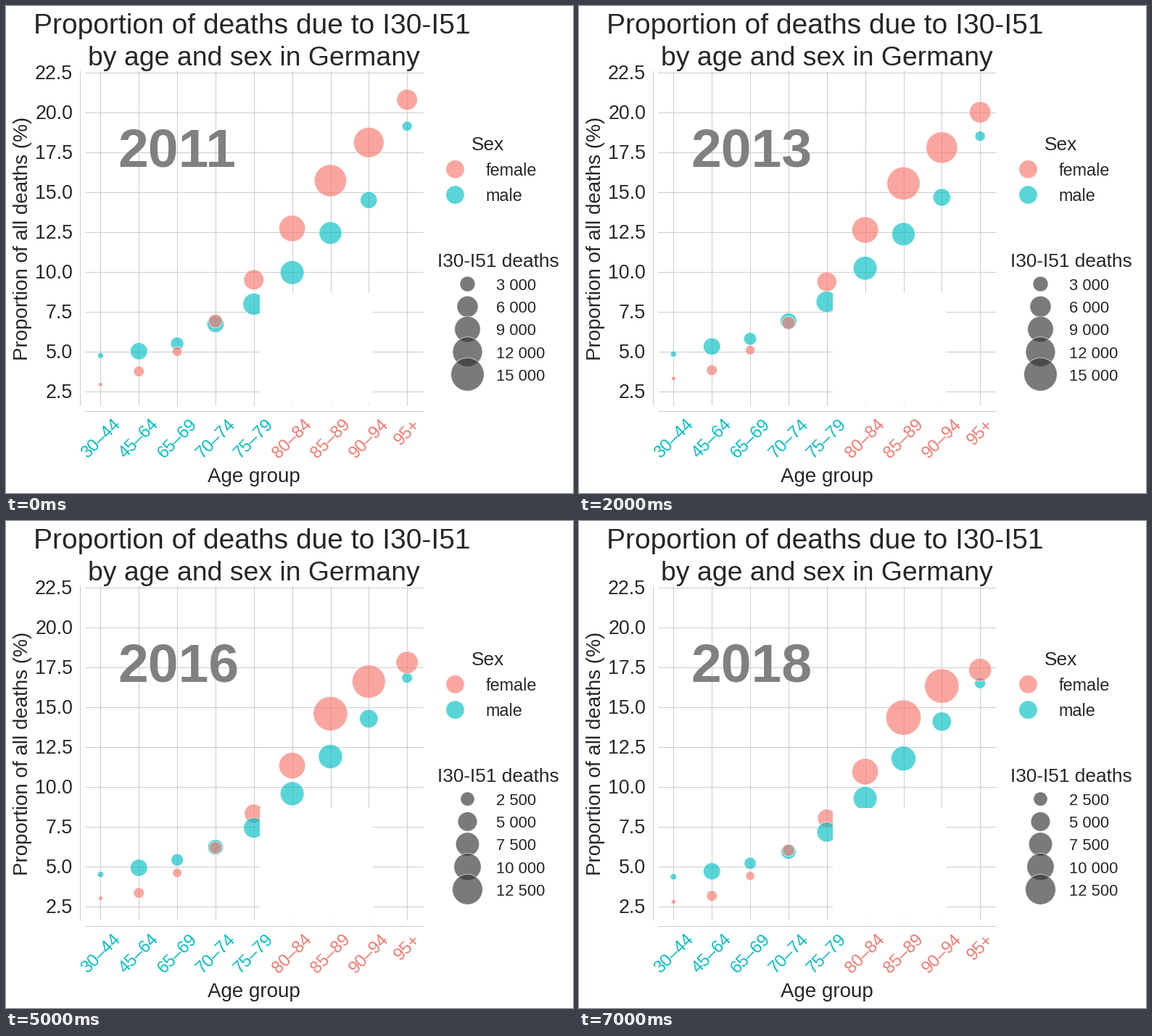
A matplotlib script that plays this animation: 782 by 672 pixels, repeating every 8000 ms.

```python
import matplotlib.pyplot as plt
import numpy as np
from matplotlib.animation import FuncAnimation
from matplotlib.patches import Circle, Rectangle

W, H, DPI = 782, 672, 100
SALMON, TEAL, GRID, INK = "#F8766D", "#00BFC4", "#cccccc", "#262626"
ALPHA = 0.65
AGES = ["30–44", "45–64", "65–69", "70–74", "75–79",
        "80–84", "85–89", "90–94", "95+"]
FIRST, PEAK, LAST = 2011, 2015, 2018
GROUP = np.arange(len(AGES))
XS = 130.4 + 52.85 * GROUP

# Per age group: share of deaths (%) at the start, turning point and end
FEMALE = np.array([
    [2.91, 3.73, 4.98, 6.89, 9.48, 12.70, 15.70, 18.09, 20.77],
    [3.66, 3.89, 5.16, 6.66, 9.23, 12.50, 15.34, 17.45, 19.20],
    [2.77, 3.14, 4.39, 6.00, 8.00, 10.93, 14.32, 16.30, 17.32]])
MALE = np.array([
    [4.73, 5.00, 5.48, 6.70, 7.95, 9.93, 12.41, 14.48, 19.11],
    [4.91, 5.59, 6.07, 7.07, 8.25, 10.48, 12.27, 14.82, 17.86],
    [4.34, 4.68, 5.18, 5.91, 7.14, 9.25, 11.75, 14.07, 16.48]])
# Mean bubble radius per age group
FEMALE_R = np.array([3, 7.3, 6.4, 8.8, 13.3, 18.2, 23.2, 22.3, 15])
MALE_R = np.array([4.2, 11.8, 8.6, 11, 14.4, 16.4, 16.3, 12.4, 7.2])

plt.rcParams["font.family"] = "Liberation Sans"
fig = plt.figure(figsize=(W / DPI, H / DPI), dpi=DPI, facecolor="white")
ax = fig.add_axes([0, 0, 1, 1])
ax.set(xlim=(0, W), ylim=(H, 0))
ax.axis("off")


def text(x, y, s, px, color=INK, **kw):
    kw.setdefault("va", "baseline")
    return ax.text(x, y, s, fontsize=px * 72 / DPI, color=color, **kw)


def line(x0, y0, x1, y1):
    ax.plot([x0, x1], [y0, y1], color=GRID, lw=0.72, zorder=1,
            solid_capstyle="butt")


def bubble(x, y, r, color, z=3):
    return ax.add_patch(Circle((x, y), r, facecolor=color, edgecolor="white",
                               alpha=ALPHA, lw=0.7, zorder=z))


def share_y(percent):
    return 91.3 + 22 * (22.5 - percent)


def share(rows, year):
    """Steady drift up to the turning point, then a quick fall that levels off."""
    if year <= PEAK:
        t = (year - FIRST) / (PEAK - FIRST)
        return rows[0] + t * (rows[1] - rows[0])
    t = 1 - (1 - (year - PEAK) / (LAST - PEAK)) ** 3.5
    return rows[1] + t * (rows[2] - rows[1])


def radius(mean, year):
    """A cohort wave: the oldest groups grow while the seventies shrink."""
    wave = np.sin(np.pi * (GROUP - 5) / 4)
    return mean * (1 + 0.018 * (year - 2014.5) * wave)


# Grid, detached spines and axis labels
for i, x in enumerate(XS):
    line(x, 89, x, 551)
    text(x + 0.5, 566.5, AGES[i], 23.8, TEAL if i < 5 else SALMON,
         rotation=45, ha="center", va="top")
for k in range(9):
    y = 92 + 55 * k
    line(109, y, 575, y)
    text(92, y + 9, f"{22.5 - 2.5 * k:.1f}", 26.7, ha="right")
line(102, 89, 102, 551)
line(109, 559, 575, 559)
text(342, 657, "Age group", 27.8, ha="center")
text(36.5, 321, "Proportion of all deaths (%)", 27.8, rotation=90,
     ha="right", va="center")
text(339, 38.5, "Proportion of deaths due to I30-I51", 39, ha="center")
text(342, 82, "by age and sex in Germany", 37.4, ha="center")
year_label = text(154.5, 221.5, "", 75, "#808080", weight="bold", zorder=2)

# Blank panel at the lower right of the plot
ax.add_patch(Rectangle((350, 396), 156, 154, color="white", lw=0, zorder=6))

# Legends
text(664.5, 199, "Sex", 26.2, ha="center")
for y, name, color in [(225.3, "female", SALMON), (260.6, "male", TEAL)]:
    bubble(619.5, y, 12.7, color)
    text(661.5, y + 8.5, name, 23.4)
text(678.5, 360, "I30-I51 deaths", 26.3, ha="center")
legend_dots, legend_labels = [], []
for k in range(5):
    y = 383.6 + 31.2 * k
    legend_dots.append(bubble(636.5, y, 10, "#333333"))
    legend_labels.append(text(676, y + 8.4, "", 22))

# The 75–79 female bubble lies below the male one
males = [bubble(x, 0, 1, TEAL) for x in XS]
females = [bubble(x, 0, 1, SALMON, 2.5 if i == 4 else 4)
           for i, x in enumerate(XS)]


def place(bubbles, rows, mean_r, year):
    ys = share_y(share(rows, year))
    for dot, x, y, r in zip(bubbles, XS, ys, radius(mean_r, year)):
        dot.center = (x, y)
        dot.radius = r


def update(i):
    year = FIRST + i
    year_label.set_text(str(year))
    place(males, MALE, MALE_R, year)
    place(females, FEMALE, FEMALE_R, year)
    step = 3000 if year <= PEAK else 2500
    for k, (dot, label) in enumerate(zip(legend_dots, legend_labels), 1):
        dot.radius = np.sqrt(8 + 0.0343 * step * k)
        label.set_text(f"{step * k:,}".replace(",", " "))
    return [year_label, *males, *females, *legend_dots, *legend_labels]


anim = FuncAnimation(fig, update, frames=LAST - FIRST + 1, interval=1000,
                     repeat=True, repeat_delay=0, blit=False)
plt.show()
```
